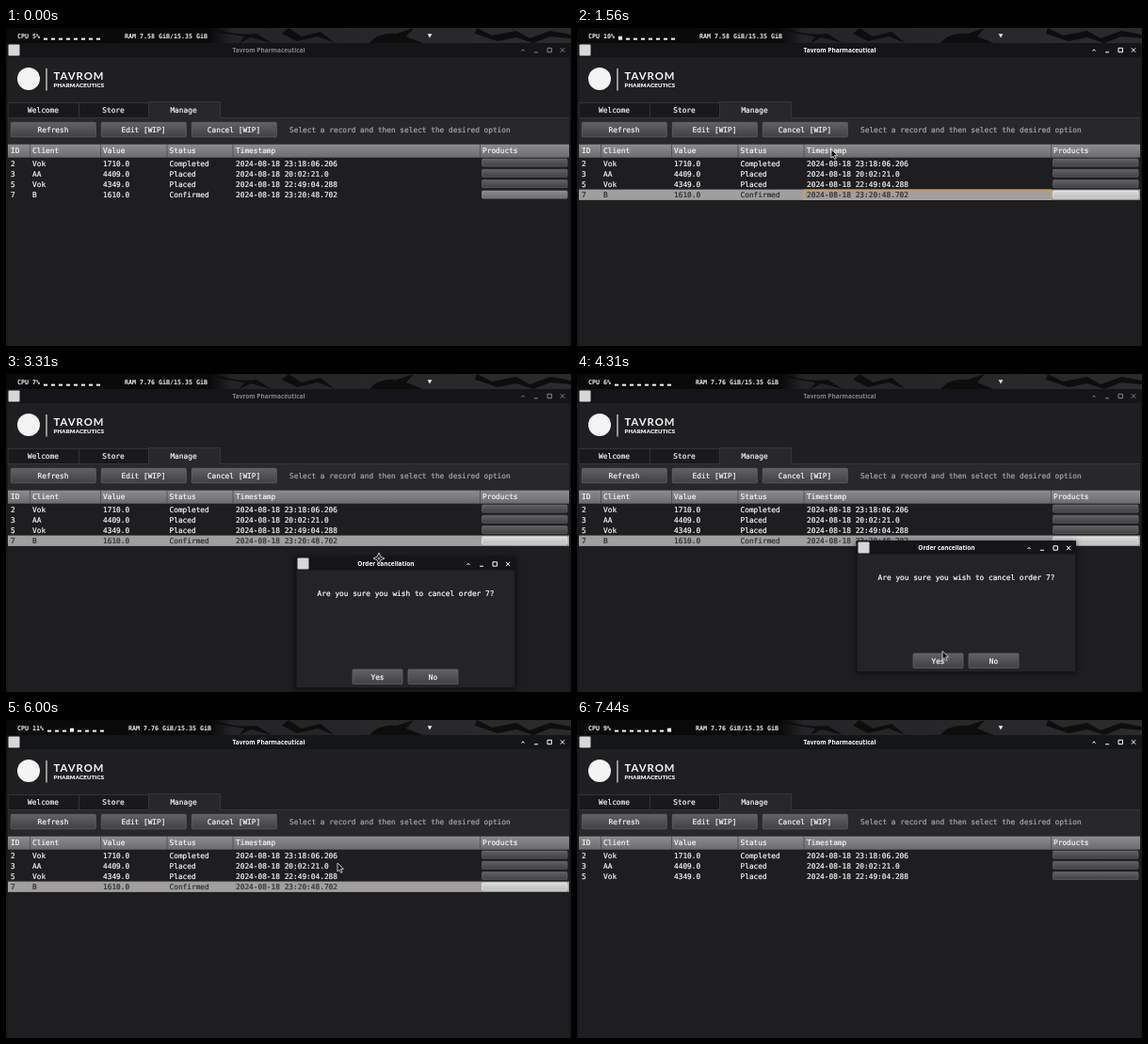
An HTML page for the animation above (8 s loop, 600 by 338 pixels).

```html
<!DOCTYPE html>
<html lang="en">
<head>
<meta charset="utf-8">
<title>Order manager</title>
<style>
  html, body { margin: 0; width: 100%; height: 100%; overflow: hidden; background: #1f1e21; }
  svg { position: absolute; inset: 0; width: 100%; height: 100%; color: #f6f6f6; }
  text {
    font: 7.8px "DejaVu Sans Mono", monospace; white-space: pre;
    fill: currentColor; stroke: currentColor; stroke-width: .2;
  }
  .mid { text-anchor: middle; }
  .title { font: bold 6.5px "Noto Sans", sans-serif; text-anchor: middle; stroke: none; }
  .name { font: bold 11.3px Lato, sans-serif; letter-spacing: 1px; stroke: none; }
  .trade { font: bold 6px Lato, sans-serif; letter-spacing: .25px; }
  .hint { color: #a9a8aa; }
  .dim { color: #85868a; }
  .lit { color: #fff; }
  .dark { color: #2b2a2c; }
  .glyphs { fill: none; stroke: currentColor; }

  #status {
    position: absolute; left: 12px; top: 4.6px; color: #f2f2f2; white-space: pre;
    font: bold 6.65px/9px "DejaVu Sans Mono", monospace;
  }
  #cpu::before { content: ""; animation: cpu 8s -4ms step-end infinite; }
  #ram { margin-left: 26px; }
  #ram::before { content: ""; animation: ram 8s -4ms step-end infinite; }

  /* The picture advances in 128 ticks of 62.5 ms. */
  .anim { animation: 8s -4ms step-end infinite; }
  #active { animation-name: active; }
  #inactive { animation-name: inactive; }
  #order { animation-name: order; }
  #selected { animation-name: selected; }
  #focus { animation-name: focus; }
  #dialog { animation-name: dialog, drag; filter: drop-shadow(0 1px 3px #0009); }
  #pointer { animation-name: pointer, travel; }
  #arrow { animation-name: arrow; }
  #grip { animation-name: grip; }

  @keyframes cpu {
    0% { content: "5% ▂ ▂ ▂ ▂ ▂ ▂ ▂ ▂"; }
    11.719% { content: "10% ▄ ▂ ▂ ▂ ▂ ▂ ▂ ▂"; }
    24.219% { content: "8% ▂ ▂ ▂ ▂ ▂ ▂ ▂ ▂"; }
    36.719% { content: "7% ▂ ▂ ▂ ▂ ▂ ▂ ▂ ▂"; }
    48.438% { content: "6% ▂ ▂ ▂ ▂ ▂ ▂ ▂ ▂"; }
    73.438% { content: "11% ▂ ▂ ▂ ▄ ▂ ▂ ▂ ▂"; }
    85.156%, 100% { content: "9% ▂ ▂ ▂ ▂ ▂ ▂ ▂ ▄"; }
  }
  @keyframes ram {
    0% { content: "RAM 7.58 GiB/15.35 GiB"; }
    36.719%, 100% { content: "RAM 7.76 GiB/15.35 GiB"; }
  }
  @keyframes active {
    0%, 25.781% { opacity: 0; }
    14.063%, 57.031%, 100% { opacity: 1; }
  }
  @keyframes inactive {
    0%, 25.781% { opacity: 1; }
    14.063%, 57.031%, 100% { opacity: 0; }
  }
  @keyframes order {
    0% { opacity: 1; }
    86.719%, 100% { opacity: 0; }
  }
  @keyframes selected {
    0% { opacity: 0; }
    14.063%, 100% { opacity: 1; }
  }
  @keyframes focus {
    0%, 25.781%, 100% { opacity: 0; }
    14.063% { opacity: 1; }
  }
  @keyframes dialog {
    0%, 57.031%, 100% { opacity: 0; }
    25.781% { opacity: 1; }
  }
  @keyframes drag {
    0% { transform: translate(334px, 220px); }
    35.156% { transform: translate(334px, 220px); animation-timing-function: steps(8); }
    41.406% { transform: translate(308px, 194px); animation-timing-function: steps(4); }
    44.531%, 100% { transform: translate(297px, 177px); }
  }
  @keyframes pointer {
    0%, 67.188%, 92.969%, 100% { opacity: 0; }
    2.344%, 72.656% { opacity: 1; }
  }
  @keyframes travel {
    0% { transform: translate(533px, 305px); }
    2.344% { transform: translate(533px, 305px); animation-timing-function: steps(4); }
    5.469% { transform: translate(430px, 230px); animation-timing-function: steps(4); }
    8.594% { transform: translate(340px, 188px); animation-timing-function: steps(4); }
    11.719% { transform: translate(300px, 177px); animation-timing-function: steps(3); }
    14.063% { transform: translate(292px, 176px); animation-timing-function: steps(7); }
    19.531% { transform: translate(270px, 129px); animation-timing-function: steps(3); }
    21.875% { transform: translate(258px, 112px); animation-timing-function: steps(3); }
    24.219% { transform: translate(257px, 109px); }
    28.125% { transform: translate(257px, 109px); animation-timing-function: steps(5); }
    32.031% { transform: translate(422px, 222px); }
    35.156% { transform: translate(422px, 222px); animation-timing-function: steps(8); }
    41.406% { transform: translate(396px, 196px); animation-timing-function: steps(4); }
    44.531% { transform: translate(385px, 179px); animation-timing-function: steps(12); }
    53.906% { transform: translate(388px, 294.5px); }
    57.031% { transform: translate(388px, 296px); animation-timing-function: steps(10); }
    64.844% { transform: translate(413px, 313px); animation-timing-function: steps(2); }
    66.406% { transform: translate(444px, 329px); }
    72.656% { transform: translate(465px, 272px); }
    73.438% { transform: translate(405px, 205px); }
    74.219% { transform: translate(364px, 162px); }
    75% { transform: translate(352px, 152px); }
    78.125% { transform: translate(352px, 152px); animation-timing-function: steps(8); }
    84.375% { transform: translate(70px, 110px); animation-timing-function: steps(3); }
    86.719% { transform: translate(56px, 107px); }
    89.063% { transform: translate(62px, 108px); animation-timing-function: steps(4); }
    92.188%, 100% { transform: translate(370px, 229px); }
  }
  @keyframes arrow {
    0%, 45.313%, 100% { opacity: 1; }
    35.156% { opacity: 0; }
  }
  @keyframes grip {
    0%, 45.313%, 100% { opacity: 0; }
    35.156% { opacity: 1; }
  }
</style>
</head>
<body>
<svg viewBox="0 0 600 338" preserveAspectRatio="none">
  <defs>
    <linearGradient id="sky"><stop offset=".36" stop-color="#09090a"/><stop offset=".4" stop-color="#242426"/><stop offset="1" stop-color="#2b2b2d"/></linearGradient>
    <linearGradient id="face" x2="0" y2="1"><stop stop-color="#626163"/><stop offset="1" stop-color="#414042"/></linearGradient>
    <linearGradient id="head" x2="0" y2="1"><stop stop-color="#8d8c8e"/><stop offset="1" stop-color="#6c6b6d"/></linearGradient>
    <linearGradient id="bright" x2="0" y2="1"><stop stop-color="#dddbdc"/><stop offset="1" stop-color="#bdbbbc"/></linearGradient>
    <path id="buttons" class="glyphs" d="M-1.5 1 0-.7 1.5 1M12 2.3h4M26-2.2h4.4v4.4H26zM39.8-2.2l4.4 4.4m0-4.4-4.4 4.4"/>
    <rect id="badge" width="12" height="12" rx="1" fill="#d9d6d7"/>
    <rect id="wide" width="90" height="15.500" rx="1" fill="url(#face)" stroke="#6a696b" stroke-width=".7"/>
    <rect id="small" width="53" height="15.500" rx="1" fill="url(#face)" stroke="#6a696b" stroke-width=".7"/>
    <rect id="cell" x="505.500" width="90.500" height="8" rx="1" stroke-width=".7"/>
    <g id="caption">
      <text class="title" x="279" y="26.200">Tavrom Pharmaceutical</text>
      <use href="#buttons" x="549" y="23.500"/>
    </g>
    <text id="last" y="180.100"><tspan x="5">7</tspan><tspan x="28">B</tspan><tspan x="103">1610.0</tspan><tspan x="173.500">Confirmed</tspan><tspan x="244">2024-08-18 23:20:48.702</tspan></text>
  </defs>

  <!-- desktop bar -->
  <rect width="600" height="17" fill="url(#sky)"/>
  <path d="M222 0q20 9 44 6l16 10-22-6-12 6 5-7-31-5zM300 0l14 9 20-5 15 12-18-7-22 5-16-8zM385 17q10-13 30-11l18-6-8 9 20 8zM500 0l16 8 26-5 14 8 22-8 22 4v4l-22-2-18 7-18-6-20 4-24-8z" fill="#0d0d0e"/>
  <path d="M447.700 6.300h4.600l-2.300 4.200z" fill="#f2f2f2"/>

  <!-- main window -->
  <rect y="16" width="600" height="322" fill="#1f1e21"/>
  <rect y="16" width="600" height="15" fill="#131519"/>
  <use href="#badge" x="2.500" y="17.500"/>
  <g id="inactive" class="anim dim"><use href="#caption"/></g>
  <g id="active" class="anim lit"><use href="#caption"/></g>

  <circle cx="24" cy="54" r="12" fill="#f4f4f4"/>
  <path d="M43 43v23.500" stroke="#e6e6e6" stroke-width="1.200"/>
  <text class="name" x="50.500" y="54.700">TAVROM</text>
  <text class="trade" x="50.500" y="63">PHARMACEUTICS</text>

  <!-- tabs -->
  <path d="M2 79.500h149v16H2z" fill="#19181b"/>
  <path d="M2 95.500h149.500v-17h76v17H598V124H2z" fill="#28272a"/>
  <path d="M2 95V79.500h149M77.500 79.500v15.500M2 95.500h149.500v-17h76v17H598" fill="none" stroke="#3c3b3e" stroke-width=".8"/>
  <text class="mid" x="39.500" y="89.800">Welcome</text>
  <text class="mid" x="114" y="89.800">Store</text>
  <text class="mid" x="188.500" y="89.800">Manage</text>

  <!-- actions -->
  <use href="#wide" x="5.300" y="100.300"/><use href="#wide" x="101.300" y="100.300"/><use href="#wide" x="197.300" y="100.300"/>
  <text class="mid" x="50" y="111.200">Refresh</text>
  <text class="mid" x="146" y="111.200">Edit [WIP]</text>
  <text class="mid" x="242" y="111.200">Cancel [WIP]</text>
  <text class="hint" x="301" y="111.200">Select a record and then select the desired option</text>

  <!-- orders -->
  <rect x="2" y="124" width="596" height="214" fill="#1e1d20"/>
  <rect x="2" y="123.700" width="596" height="14" fill="url(#head)"/>
  <path d="M25.500 124v13.500m75-13.500v13.500m70.500-13.500v13.500m70-13.500v13.500m262.500-13.500v13.500" stroke="#4b4a4c" stroke-width=".8"/>
  <text y="133.200"><tspan x="5">ID</tspan><tspan x="28">Client</tspan><tspan x="103">Value</tspan><tspan x="173.500">Status</tspan><tspan x="244">Timestamp</tspan><tspan x="506">Products</tspan></text>
  <text y="146.500"><tspan x="5">2</tspan><tspan x="28">Vok</tspan><tspan x="103">1710.0</tspan><tspan x="173.500">Completed</tspan><tspan x="244">2024-08-18 23:18:06.206</tspan></text>
  <text y="157.700"><tspan x="5">3</tspan><tspan x="28">AA</tspan><tspan x="103">4409.0</tspan><tspan x="173.500">Placed</tspan><tspan x="244">2024-08-18 20:02:21.0</tspan></text>
  <text y="168.900"><tspan x="5">5</tspan><tspan x="28">Vok</tspan><tspan x="103">4349.0</tspan><tspan x="173.500">Placed</tspan><tspan x="244">2024-08-18 22:49:04.288</tspan></text>
  <g fill="url(#face)" stroke="#69686a">
    <use href="#cell" y="139.100"/><use href="#cell" y="150.300"/><use href="#cell" y="161.600"/>
  </g>
  <g id="order" class="anim">
    <use href="#last"/>
    <use href="#cell" y="173.100" fill="url(#head)" stroke="#959496"/>
    <g id="selected" class="anim dark">
      <rect x="2" y="171.600" width="596" height="11.300" fill="#a09e9f"/>
      <use href="#last"/>
      <use href="#cell" y="173.100" fill="url(#bright)" stroke="#f3f1f2"/>
      <rect id="focus" class="anim" x="241" y="172.100" width="262.500" height="10.400" fill="none" stroke="#e5a03c"/>
    </g>
  </g>
  <path d="M1 31v307M599 31v307" stroke="#151417"/>

  <!-- confirmation -->
  <g id="dialog" class="anim lit">
    <rect x="-.5" width="233.500" height="140" fill="#131519"/>
    <rect x=".5" y="14.500" width="231.500" height="124.500" fill="#242326"/>
    <use href="#badge" x="1.500" y="1.500"/>
    <text class="title" x="95.500" y="10.200">Order cancellation</text>
    <use href="#buttons" x="183" y="8"/>
    <text class="mid" x="116.500" y="41.600">Are you sure you wish to cancel order 7?</text>
    <use href="#small" x="60" y="120"/><use href="#small" x="119" y="120"/>
    <text class="mid" x="86.500" y="130.800">Yes</text>
    <text class="mid" x="145.500" y="130.800">No</text>
  </g>

  <g id="pointer" class="anim" fill="#111" stroke="#e8e8e8" stroke-width=".8" stroke-linejoin="round">
    <path id="arrow" class="anim" d="M0 0v9l2-1.800 1.700 3.300 1.500-.8-1.600-3.200 2.900-.2z"/>
    <path id="grip" class="anim" d="M0-6 1.800-1.800 6 0 1.800 1.800 0 6-1.800 1.800-6 0-1.800-1.800zM-1.500 0h3M0-1.500v3"/>
  </g>
</svg>
<div id="status">CPU <span id="cpu"></span><span id="ram"></span></div>
</body>
</html>
```
